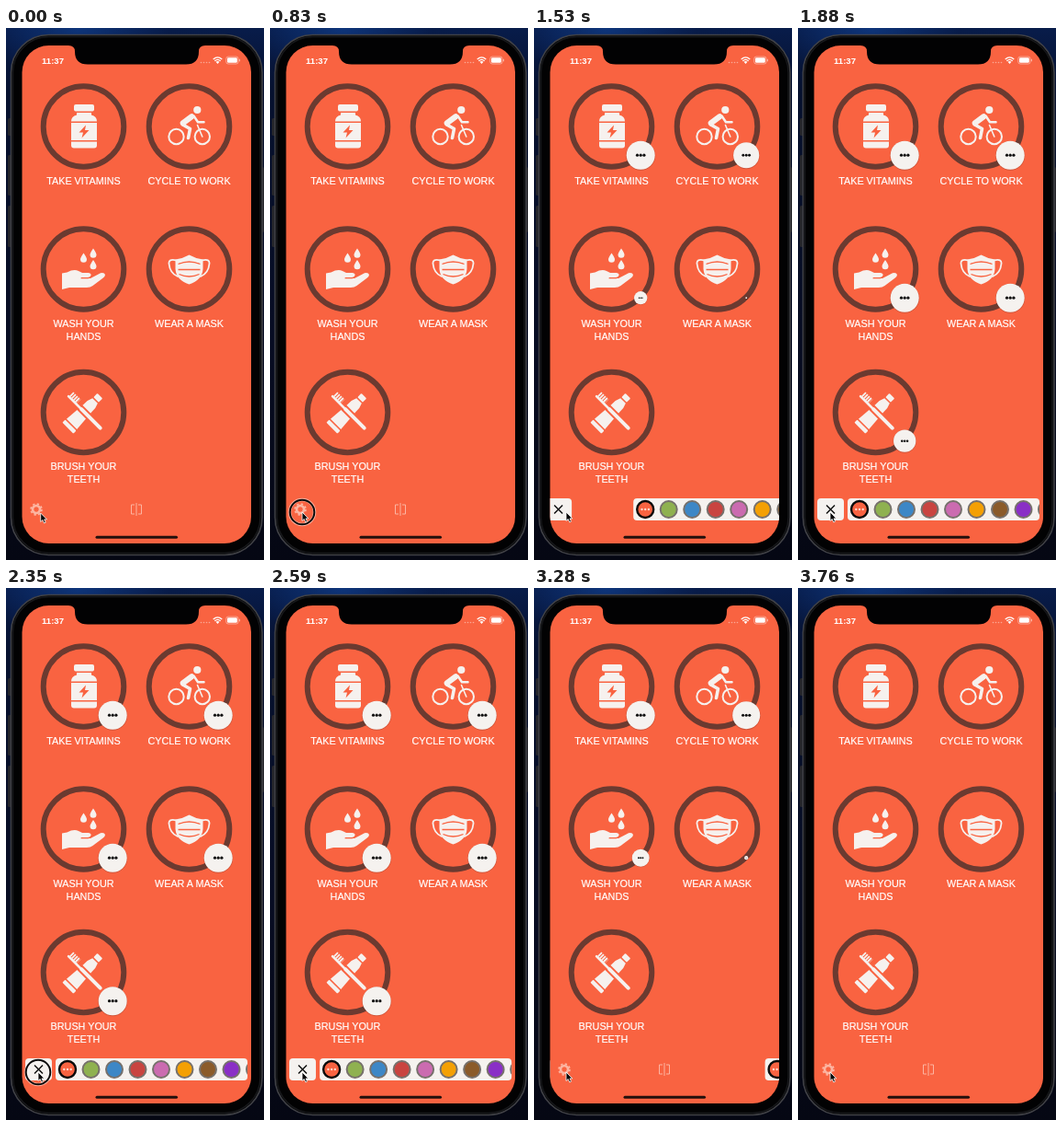
These frames come from a looping animation (281x578 px, 3.97 s). An HTML page:

```html
<!DOCTYPE html>
<html lang="en">
<head>
<meta charset="utf-8">
<title>Habit tracker</title>
<style>
  html, body { margin: 0; width: 100%; height: 100%; overflow: hidden; background: #050a1c; }
  svg { display: block; width: 281px; height: 578px; }
  text { font-family: "Liberation Sans", Arial, sans-serif; fill: #fff; text-anchor: middle; }
  .label { font-size: 10.8px; stroke: #fff; stroke-width: .2px; }
  .clock { font-size: 9.6px; font-weight: bold; }
  .icon { fill: #f6f1ee; stroke: none; }
  .line { fill: none; stroke: #f6f1ee; stroke-linecap: round; stroke-linejoin: round; }
  .cut { fill: none; stroke: #f96341; }
  .faint { fill: none; stroke: #fcb5a2; }
</style>
</head>
<body>
<svg viewBox="0 0 281 578" xmlns="http://www.w3.org/2000/svg">
  <defs>
    <linearGradient id="night" x2="0" y2="1">
      <stop offset="0" stop-color="#081c4a"/>
      <stop offset=".12" stop-color="#06112f"/>
      <stop offset=".6" stop-color="#070c22"/>
      <stop offset="1" stop-color="#050713"/>
    </linearGradient>
    <radialGradient id="glow" cx=".28" cy="0" r=".35" gradientTransform="scale(1 .3)">
      <stop offset="0" stop-color="#12459a" stop-opacity=".6"/>
      <stop offset="1" stop-color="#12459a" stop-opacity="0"/>
    </radialGradient>
    <clipPath id="screen"><rect x="17.5" y="19" width="249.5" height="541" rx="29"/></clipPath>
    <clipPath id="strip"><rect x="54" y="511" width="209" height="24" rx="4"/></clipPath>
  </defs>

  <rect width="281" height="578" fill="url(#night)"/>
  <rect width="281" height="578" fill="url(#glow)"/>

  <g fill="#25262b">
    <rect x="2" y="98" width="5" height="19" rx="1.5"/>
    <rect x="2" y="138" width="5" height="44" rx="1.5"/>
    <rect x="2" y="193" width="5" height="45" rx="1.5"/>
    <rect x="277" y="151" width="4" height="71" rx="1.5"/>
  </g>
  <rect x="5.5" y="7.5" width="273.5" height="565" rx="41" fill="#020203" stroke="#414247" stroke-width="1.6"/>
  <rect x="7.5" y="9.5" width="269.500" height="561" rx="39" fill="none" stroke="#17181b" stroke-width="1.5"/>

  <g clip-path="url(#screen)">
    <rect x="17" y="18" width="251" height="543" fill="#f96341"/>
    <path d="M68 18V19Q75 19 75 25.500Q75 39.500 89 39.500H196Q210 39.500 210 25.500Q210 19 217 19V18Z" fill="#020203"/>

    <text class="clock" x="51" y="38.500">11:37</text>
    <g fill="#fff">
      <g opacity=".45">
        <circle cx="212.500" cy="37.500" r=".8"/><circle cx="215.500" cy="37.500" r=".8"/>
        <circle cx="218.500" cy="37.500" r=".8"/><circle cx="221.500" cy="37.500" r=".8"/>
      </g>
      <path d="M230.500 39L228.500 36.700Q230.500 35.200 232.500 36.700Z"/>
      <rect x="241" y="32.300" width="10.800" height="5.500" rx="1.300"/>
    </g>
    <g fill="none" stroke="#fff">
      <path d="M225.700 34Q230.500 29.700 235.300 34M227.300 35.800Q230.500 33 233.700 35.800" stroke-width="1.300"/>
      <rect x="239.800" y="31.100" width="13.200" height="7.900" rx="2.200" stroke-width=".7" opacity=".6"/>
      <path d="M254.300 33.800V36.300" stroke-width="1" opacity=".6"/>
    </g>

    <g id="rings" fill="none" stroke="#6b3a30" stroke-width="6"></g>

    <!-- vitamins -->
    <g class="icon">
      <rect x="74" y="83" width="22" height="7.500" rx="2"/>
      <path d="M77 92H93V94.500Q99 96 99 101.500H71Q71 96 77 94.500Z"/>
      <rect x="71" y="103" width="28" height="19"/>
      <path d="M71 123.500H99V127.500Q99 130.500 96 130.500H74Q71 130.500 71 127.500Z"/>
      <path d="M87 105.500L79.500 113.500H84L82.500 119.500L90.500 111H86Z" fill="#f96341"/>
    </g>

    <!-- bicycle -->
    <g class="line" stroke-width="2">
      <circle cx="185.500" cy="118" r="8.200"/>
      <circle cx="213.800" cy="118" r="8.200"/>
      <path d="M213.800 118L208.500 105.500" stroke-width="1.600"/>
      <path d="M204.500 95.500L209 102.300H215.500" stroke-width="2.500"/>
      <path d="M192.500 105L200.500 109.500L198.500 119.500" stroke-width="3.600"/>
      <path d="M192.800 103.300L202.200 96.300" stroke-width="6.200"/>
    </g>
    <circle class="icon" cx="208.300" cy="89" r="4.100"/>

    <!-- hand and drops -->
    <g class="icon">
      <path id="drop" d="M95 239.500Q98.500 244.500 98.500 246.300A3.500 3.500 0 0 1 91.500 246.300Q91.500 244.500 95 239.500Z"/>
      <use href="#drop" x="-10.500" y="5"/>
      <use href="#drop" x="0" y="12.500"/>
      <path d="M61 266.500L66.500 265.500Q74 261.500 79 264L83 266H90Q93 266.500 92.500 269Q92 271 89 271H82V272H92L103 266.300Q107 265.300 108 268Q108 270 105.500 271.700L94.500 280Q92 282 88 282H69L61 284Z"/>
    </g>
    <path class="cut" d="M81.500 271.800H89.500Q92.500 271.300 93 269" stroke-width="1"/>

    <!-- mask -->
    <path class="line" d="M185 252.300Q177 250.500 177.500 256Q178.500 266.500 187 270M214 252.300Q222 250.500 221.500 256Q220.500 266.500 212 270" stroke-width="1.800"/>
    <path class="icon" d="M184.500 251.500Q192.500 250.500 199.500 246.500Q206.500 250.500 214.500 251.500V262Q213.500 274 199.500 278.500Q185.500 274 184.500 262Z"/>
    <path class="cut" d="M187.500 256.500Q199.500 251.500 211.500 256.500M187.500 262.500H211.500M188.500 267.500Q199.500 272.500 210.500 267.500" stroke-width="1.300"/>

    <!-- toothpaste and brush -->
    <g transform="translate(85 417) rotate(-45)" class="icon">
      <rect x="18.500" y="-4" width="6" height="8" rx="1"/>
      <path d="M17 -4V4Q12 6.500 6 6L-19 8V-8L6 -6Q12 -6.500 17 -4Z"/>
      <rect x="-25" y="-8.500" width="4.500" height="17" rx="1"/>
    </g>
    <g transform="translate(85 417) rotate(45)">
      <path d="M-24 0H24" fill="none" stroke="#f96341" stroke-width="8"/>
      <path class="line" d="M-24 0H-6" stroke-width="2.500"/>
      <path class="line" d="M-4 0H25" stroke-width="4"/>
      <path class="line" d="M-23.500 -4H-12" stroke-width="6" stroke-dasharray="1.800 1" style="stroke-linecap:butt"/>
    </g>

    <g id="labels"></g>

    <!-- toolbar -->
    <g class="faint" transform="translate(33 523)">
      <circle r="4" stroke-width="2.600"/>
      <circle r="5.900" stroke-width="1.800" stroke-dasharray="2.317"/>
    </g>
    <g class="faint" transform="translate(142 523)" stroke-width="1">
      <path d="M-2 -5H-5.500V5H-2M2 -5H5.500V5H2" stroke-dasharray="none"/>
      <path d="M0 -7V7"/>
    </g>
    <rect x="97.500" y="551.800" width="89.500" height="3" rx="1.500" fill="#23100c"/>

    <g id="dots"></g>

    <g id="close">
      <rect x="21" y="511" width="29" height="24" rx="4" fill="#f5f2ef"/>
      <path d="M31 518.500L40 527.500M40 518.500L31 527.500" stroke="#111" stroke-width="1.500" fill="none"/>
    </g>
    <g id="palette">
      <rect x="54" y="511" width="209" height="24" rx="4" fill="#f5f2ef"/>
      <g id="swatches" clip-path="url(#strip)"></g>
    </g>
  </g>

  <g id="click" fill="none">
    <circle cx="35" cy="526" r="13.500" stroke="#fff" stroke-opacity=".5" stroke-width="3.500"/>
    <circle cx="35" cy="526" r="13.300" stroke="#0b0b0b" stroke-width="2"/>
  </g>
  <path id="cursor" d="M0 0V9.500L2.200 7.500L3.800 11L5.500 10.200L4 6.900H6.800Z" fill="#080808" stroke="#fff" stroke-width=".8"/>
</svg>
<script>
const LOOP = 3970, STEP = 117.5;
const OPEN = 1046, SHUT = 2572, SLIDE = 740;
const POP = 430, STAGGER = 133;

const $ = id => document.getElementById(id);
const NS = "http://www.w3.org/2000/svg";
function add(parent, tag, attrs, text) {
  const el = document.createElementNS(NS, tag);
  for (const k in attrs) el.setAttribute(k, attrs[k]);
  if (text) el.textContent = text;
  return parent.appendChild(el);
}

const habits = [
  [84.5, 107, "TAKE VITAMINS"],
  [199.5, 107, "CYCLE TO WORK"],
  [84.5, 262, "WASH YOUR", "HANDS"],
  [199.5, 262, "WEAR A MASK"],
  [84.5, 417.5, "BRUSH YOUR", "TEETH"]
];

const buttons = habits.map(([x, y, ...lines]) => {
  add($("rings"), "circle", { cx: x, cy: y, r: 43.8 });
  lines.forEach((s, i) => add($("labels"), "text", { class: "label", x, y: y + 62.7 + i * 14 }, s));
  const g = add($("dots"), "g", {});
  add(g, "circle", { cy: .6, r: 16, fill: "#5a2a20", opacity: .25 });
  add(g, "circle", { r: 15.5, fill: "#f5f2ef" });
  for (const dx of [-3.7, 0, 3.7]) add(g, "circle", { cx: dx, r: 1.6, fill: "#111" });
  return { g, x: x + 31.7, y: y + 31.2 };
});

["#f96341", "#8fb150", "#3d87c6", "#c94440", "#cb6bb0", "#f4a004", "#8b5b2a", "#8a2fc6", "#777"].forEach((fill, i) => {
  const cx = 67 + i * 25.5;
  add($("swatches"), "circle", { cx, cy: 523, r: 9, fill, stroke: i ? "#77716c" : "#0b0b0b", "stroke-width": i ? 2 : 2.4 });
  if (!i) for (const dx of [-3.7, 0, 3.7]) add($("swatches"), "circle", { cx: cx + dx, cy: 523, r: 1.2, fill: "#ffd9cd" });
});

const clamp = x => Math.min(1, Math.max(0, x));

// cubic-bezier(.42, 0, .58, 1), solved by bisection
function ease(x) {
  if (x <= 0 || x >= 1) return clamp(x);
  let lo = 0, hi = 1, u;
  for (let i = 0; i < 20; i++) {
    u = (lo + hi) / 2;
    const at = 3 * (1 - u) * (1 - u) * u * .42 + 3 * (1 - u) * u * u * .58 + u * u * u;
    if (at < x) lo = u; else hi = u;
  }
  return u * u * (3 - 2 * u);
}
const tween = (t, start, len) => ease((t - start) / len);
const move = (el, x, y, s = 1) => el.setAttribute("transform", `translate(${x} ${y}) scale(${s})`);

function draw(t) {
  const away = 1 - tween(t, OPEN, SLIDE) + tween(t, SHUT, SLIDE);
  move($("close"), -35 * away, 0);
  move($("palette"), 213 * away, 0);

  buttons.forEach(({ g, x, y }, i) => {
    const grow = tween(t, OPEN + 10 + i * STAGGER, POP);
    const shrink = tween(t, SHUT + 147 + (4 - i) * STAGGER, POP);
    const s = grow - shrink;
    g.style.display = s > .001 ? "" : "none";
    move(g, x, y, s);
  });

  const pressed = [OPEN, SHUT].some(at => t >= at - 225 && t < at - 5);
  $("click").style.display = pressed ? "" : "none";

  const m = clamp((t - 235) / 350);
  move($("cursor"), 37.7 - 2.7 * m, 527 - m);
}

// the picture advances in steps, like the recording
function frame(now) {
  draw(Math.floor((now % LOOP + 8) / STEP) * STEP);
  requestAnimationFrame(frame);
}
const begin = performance.now();
draw(0);
requestAnimationFrame(function run() {
  frameAt(performance.now() - begin);
  requestAnimationFrame(run);
});
function frameAt(ms) {
  draw(Math.floor((ms % LOOP + 8) / STEP) * STEP);
}
</script>
</body>
</html>
```
